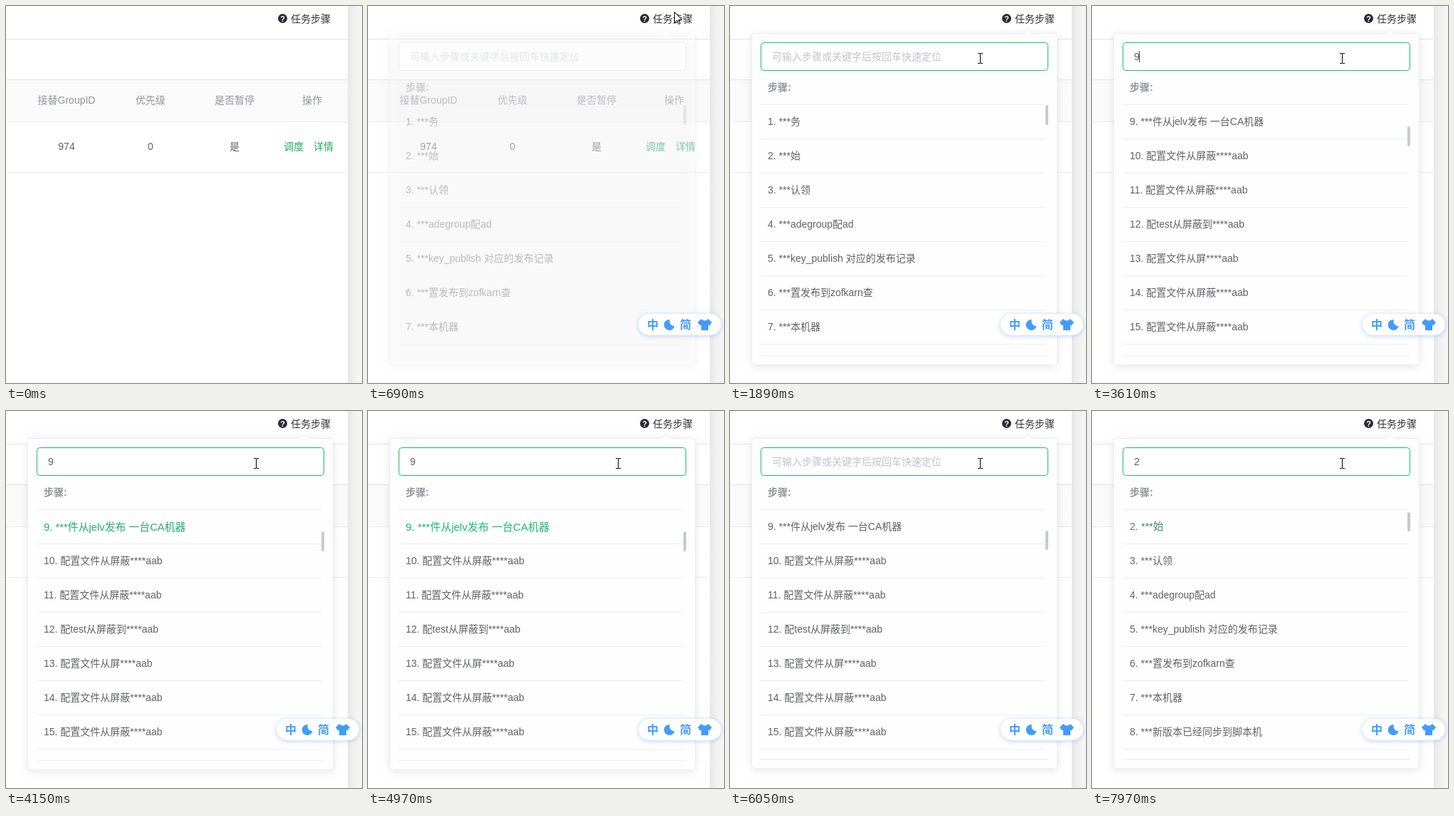
Write an HTML page with a canvas that moves like this. It is 500 by 529 pixels and loops after 8000 ms.

```html
<!DOCTYPE html>
<html lang="zh-CN">
<head>
<meta charset="utf-8">
<title>步骤定位</title>
<style>
  html, body { margin: 0; width: 100%; height: 100%; overflow: hidden; background: #fff; }
  canvas { display: block; }
</style>
</head>
<body>
<canvas id="stage" width="500" height="529"></canvas>
<script>
const ctx = document.getElementById('stage').getContext('2d');
const LOOP = 8000;
const FONT = 'px "Liberation Sans", "Noto Sans CJK SC", "Noto Sans CJK", sans-serif';
const GREEN = [25, 190, 107], GREY = [96, 98, 102], BORDER = [192, 196, 204], LIGHT = [220, 223, 230];
const BLUE = '#409cff', BODY = '#606266';
const PLACEHOLDER = '可输入步骤或关键字后按回车快速定位';
const STEPS = [
  '***务', '***始', '***认领', '***adegroup配ad', '***key_publish 对应的发布记录',
  '***置发布到zofkarn查', '***本机器', '***新版本已经同步到脚本机', '***件从jelv发布 一台CA机器',
  '配置文件从屏蔽****aab', '配置文件从屏蔽****aab', '配test从屏蔽到****aab',
  '配置文件从屏****aab', '配置文件从屏蔽****aab', '配置文件从屏蔽****aab'
];
// Caret is visible during these spans
const CARET = [[1370, 1890], [2420, 2960], [3350, 3880], [4440, 4970], [5510, 6050], [6570, 7100], [7430, 7960]];

const progress = (t, from, to) => Math.min(1, Math.max(0, (t - from) / (to - from)));
const mix = (a, b, k) => `rgb(${a.map((v, i) => Math.round(v + (b[i] - v) * k))})`;

// CSS "ease" curve
function ease(x) {
  let lo = 0, hi = 1;
  const curve = (u, a, b) => 3 * a * u * (1 - u) ** 2 + 3 * b * u * u * (1 - u) + u ** 3;
  for (let i = 0; i < 20; i++) {
    const mid = (lo + hi) / 2;
    if (curve(mid, .25, .25) < x) lo = mid; else hi = mid;
  }
  return curve(lo, .1, 1);
}

function text(s, x, y, color, size = 14, weight = '', align = 'left') {
  ctx.font = `${weight} ${size}${FONT}`;
  ctx.textAlign = align;
  ctx.fillStyle = color;
  ctx.fillText(s, x, y);
}

function rect(x, y, w, h, color) {
  ctx.fillStyle = color;
  ctx.fillRect(x, y, w, h);
}

function box(x, y, w, h, r, fill, stroke) {
  ctx.beginPath();
  ctx.roundRect(x, y, w, h, r);
  ctx.fillStyle = fill;
  ctx.fill();
  if (stroke) {
    ctx.shadowColor = 'transparent';
    ctx.strokeStyle = stroke;
    ctx.stroke();
  }
}

function shadow(color, blur, dy) {
  ctx.shadowColor = color;
  ctx.shadowBlur = blur;
  ctx.shadowOffsetY = dy;
}

function layer(alpha, draw) {
  if (alpha <= 0) return;
  ctx.save();
  ctx.globalAlpha = alpha;
  draw();
  ctx.restore();
}

function drawPage() {
  rect(0, 0, 500, 529, '#fff');
  const edge = ctx.createLinearGradient(480, 0, 500, 0);
  edge.addColorStop(0, '#e7e7e7');
  edge.addColorStop(.5, '#f1f1f1');
  edge.addColorStop(1, '#f6f6f6');
  rect(480, 0, 20, 529, edge);
  rect(0, 104, 480, 58, '#fafafa');
  rect(0, 46, 480, 1, '#e2e4e8');
  rect(0, 103, 480, 1, '#e2e4e8');
  for (const y of [162, 233]) rect(0, y, 480, 1, '#e8ebf2');

  const cells = [['接替GroupID', '974', 85], ['优先级', '0', 203], ['是否暂停', '是', 321], ['操作', '', 430]];
  for (const [head, value, x] of cells) {
    text(head, x, 137, '#909399', 14, '', 'center');
    text(value, x, 202, BODY, 14, '', 'center');
  }
  text('调度', 390, 202, '#20ad58');
  text('详情', 432, 202, '#20ad58');

  ctx.beginPath();
  ctx.arc(388.5, 17.5, 6.5, 0, 7);
  ctx.fillStyle = '#2c2a35';
  ctx.fill();
  text('?', 388.5, 21.5, '#fff', 11, 'bold', 'center');
  text('任务步骤', 400, 23, '#303133');
}

function drawPopup(t) {
  const second = t >= 7690, jumped = t >= 3610;
  const first = second ? 2 : jumped ? 9 : 1;
  const shrink = t >= 5160 ? 2 : 0;
  const glow = second ? ease(progress(t, 7690, 8690))
    : t < 5160 ? ease(progress(t, 3610, 4610)) : 1 - ease(progress(t, 5160, 6060));

  ctx.save();
  shadow('rgba(0,0,0,.1)', 12, 2);
  box(30.5, 38.5, 429, 465 - shrink, 4, '#fefefe', '#ebeef5');
  ctx.restore();
  ctx.beginPath();
  ctx.moveTo(412, 39);
  ctx.lineTo(418.5, 33);
  ctx.lineTo(425, 39);
  ctx.fillStyle = '#fff';
  ctx.fill();
  ctx.strokeStyle = '#ebeef5';
  ctx.stroke();

  const border = t < 1370 ? mix(LIGHT, BORDER, progress(t, 1020, 1230))
    : mix(BORDER, GREEN, ease(progress(t, 1370, 1570)));
  box(43.5, 51.5, 403, 39, 4, '#fff', border);
  const value = t >= 7430 ? '2' : t >= 3350 && t < 5510 ? '9' : '';
  text(value || PLACEHOLDER, 59, 76, value ? BODY : '#c0c4cc');
  if (CARET.some(([on, off]) => t >= on && t < off)) rect(value ? 66 : 59, 63, 1, 16, '#404244');

  text('步骤:', 53, 119, '#909399', 14, 'bold');
  rect(43, 138, 400, 1, '#ebeef5');
  for (let i = 0; i < 7; i++) {
    const n = first + i, k = i || !jumped ? 0 : glow;
    text(`${n}. ${STEPS[n - 1]}`, 53, Math.round(167 + 48 * i + k * .6), mix(GREY, GREEN, k), 14 + k);
    rect(43, 186 + 48 * i, 400, 1, '#ebeef5');
  }
  rect(43, 490 - shrink, 404, 1, '#ebeef5');

  const thumbY = second ? 142 : jumped ? 169 - shrink / 2 : 139;
  box(443, thumbY, 4, shrink ? 27 : 28, 2, first === 9 ? '#bfd0c8' : '#c9c9cb');
}

function drawInputBar() {
  ctx.save();
  shadow('rgba(64,140,230,.4)', 6, 1);
  box(380, 432, 116, 30, 15, '#fff');
  ctx.restore();
  text('中', 392, 453, BLUE, 16, 'bold');
  text('简', 438, 453, BLUE, 16, 'bold');
  ctx.fill(new Path2D('M424 440A7.5 7.5 0 1 0 430.5 449A6.5 6.5 0 0 1 424 440Z'));
  ctx.fill(new Path2D('M468 439Q473 444 478 439L483 444L479.5 448.5L478 447.5V455H468V447.5L466.5 448.5L463 444Z'));
}

function drawCursor(t) {
  if (t < 70) return;
  if (t >= 1230) {
    const beam = new Path2D('M348 66.5H351L351.5 67L352 66.5H355M351.5 67V80M348 80.5H351L351.5 80L352 80.5H355');
    ctx.strokeStyle = '#000';
    ctx.stroke(beam);
    return;
  }
  // Pointer stops, as [time, x, y]
  const stops = [[70, 74, 79], [280, 455, 447], [420, 455, 447], [680, 430, 8], [1020, 430, 8], [1230, 352, 73]];
  const i = stops.findIndex(s => t < s[0]);
  const [t0, x0, y0] = stops[i - 1], [t1, x1, y1] = stops[i];
  const k = progress(t, t0, t1);
  ctx.save();
  ctx.translate(x0 + (x1 - x0) * k, y0 + (y1 - y0) * k);
  const arrow = new Path2D('M.5 .5V15.5L4 12L6.5 17.5L8.5 16.5L6 11.5H11Z');
  ctx.fillStyle = '#fff';
  ctx.fill(arrow);
  ctx.strokeStyle = '#000';
  ctx.stroke(arrow);
  ctx.restore();
}

function render(now) {
  const t = now % LOOP;
  drawPage();
  layer(progress(t, 600, 820), () => drawPopup(t));
  const bar = t < 1370 ? progress(t, 70, 280) : .4 + .6 * progress(t, 1370, 1560);
  layer(bar, drawInputBar);
  drawCursor(t);
  requestAnimationFrame(render);
}
requestAnimationFrame(render);
</script>
</body>
</html>
```
